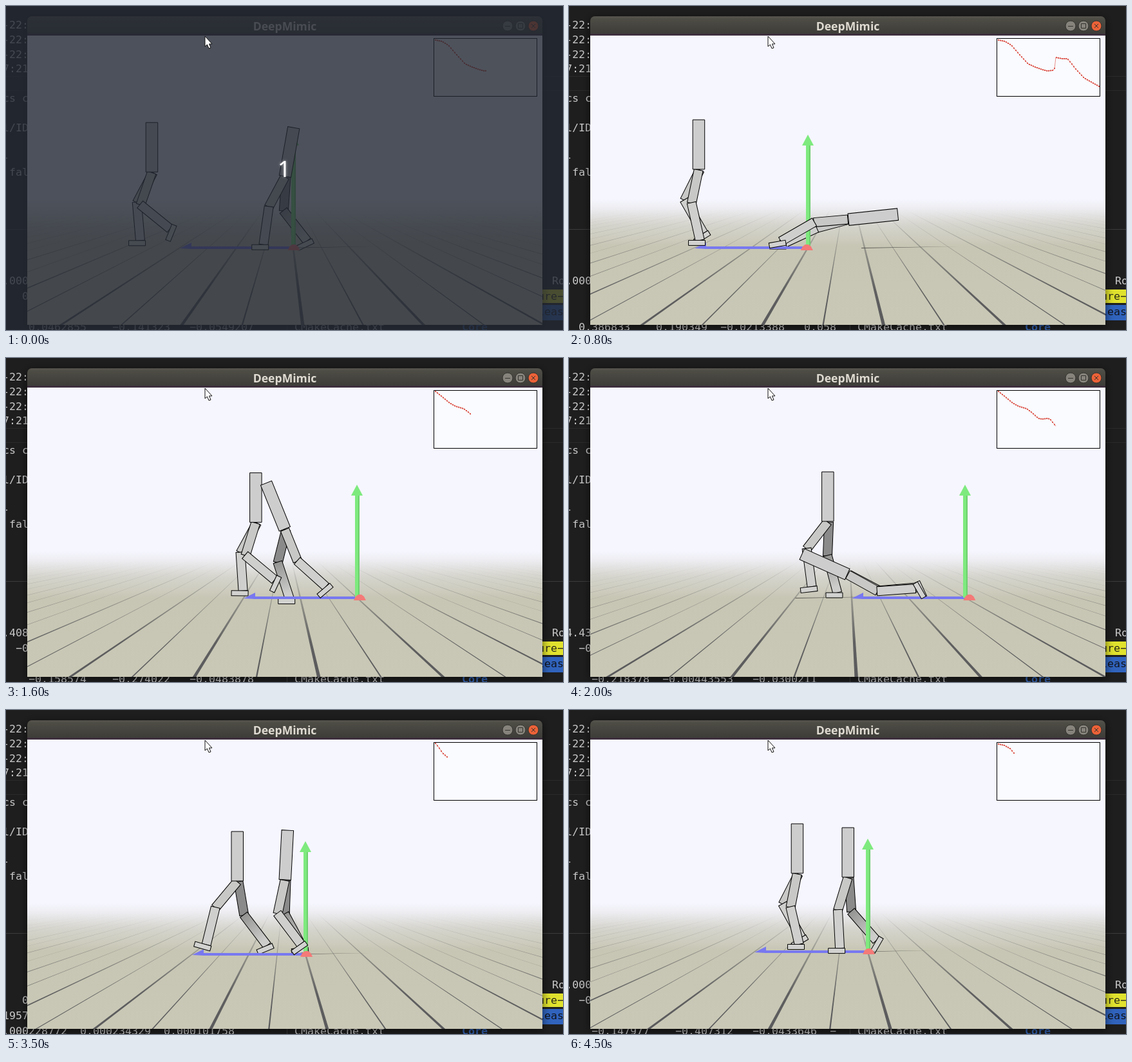
Animation, 865 px wide and 504 px high, one loop 4600 ms. Source, as an HTML page with a canvas:

```html
<!DOCTYPE html>
<html lang="en">
<head>
<meta charset="utf-8">
<title>DeepMimic</title>
<style>
html, body { margin: 0; width: 865px; height: 504px; overflow: hidden; background: #1e1e1e; }
canvas { display: block; }
</style>
</head>
<body>
<canvas id="stage" width="865" height="504"></canvas>
<script>
const g = document.getElementById('stage').getContext('2d');
const LOOP = 4600, STEP = 100, VX = 433, VY = 270;
const MONO = '"DejaVu Sans Mono", monospace';

// Terminal output: start time, three left-hand rows, bottom row
const rows = [
  [0, '.000', '   0', '', '    0.0462855    −0.141323   −0.0549207'],
  [200, '.000', '', '', '  0.386833    0.190349  −0.0213388   0.058'],
  [900, '.408', '  −0', '', '    −0.158574    −0.274022   −0.0483878'],
  [1800, '4.43', '  −0', '', '    −0.218378  −0.00443553   −0.0300211'],
  [2500, '.018', '  0.', '', '    −0.152534    0.0369446   −0.0526555'],
  [3300, '', '   0', '1957', '.000228772  0.000234329  0.000101758'],
  [4300, '.000', '  −0', '', '    −0.147977    −0.407312   −0.0433646  −']
];

// One leg over a stride: phase, thigh, shin and foot angle in degrees
const stride = [
  [0, 40, 14, 16], [.12, 28, -5, 0], [.25, 11, -13, 0], [.36, 2, -15, 0],
  [.5, -10, -37, -22], [.62, 19, -51, -68], [.75, 27, -29, -30], [.86, 38, -7, -6], [1, 40, 14, 16]
];
const fallen = [-66, -61, -94, -120, -62, -95, -115];

// Pose keys: time, torso, near leg (3), far leg (3), x, hip height
const episodes = [
  { begin: -820, ground: 376, phase: .256, x: 57, rate: .0975,
    keys: [[0, 10, 28, 8, 0, 4, -38, -25, -13, 110], [400, 36, 42, 23, -10, 31, -27, 0, 23, 102],
      [800, 84, 85, 60, -10, 75, 65, 0, 62, 44]],
    reward: [667, 53, 677, 55, 687, 61, 700, 76, 713, 90, 724, 95, 735, 99, 743, 101, 752, 100,
      754, 97, 756, 80, 766, 82, 774, 82, 780, 89, 786, 97, 800, 112, 823, 125] },
  { begin: 940, ground: 373, phase: .21, x: -65, rate: .084,
    keys: [[1200, -4, 9, -15, -4, -7, -34, -35, -41, 114], [1600, -22, -22, -48, -40, 14, -18, 0, -112, 106],
      [2000, ...fallen, -182, 36]],
    reward: [667, 52, 677, 60, 689, 70, 698, 75, 711, 79, 719, 85, 729, 94, 735, 95, 743, 94, 747, 95, 756, 106, 766, 115] },
  { begin: 2060, ground: 380, phase: .45, x: -57, rate: .098,
    keys: [[2700, -18, -15, -49, -78, -3, -36, 0, -87, 107], [3150, ...fallen, -165, 36]],
    reward: [667, 52, 678, 62, 698, 67, 710, 75, 716, 79, 720, 78, 731, 80, 745, 84, 760, 96, 790, 118] },
  { begin: 3300, ground: 380, phase: -.12, x: -78, rate: .09,
    keys: [[3500, 3, 12, -37, -35, 2, -28, -5, -32, 115], [3850, -20, -20, -52, -70, -2, -35, 0, -88, 107],
      [4200, ...fallen, -165, 36]],
    reward: [667, 52, 672, 58, 678, 67, 685, 73, 700, 80, 715, 84, 735, 97, 755, 112] },
  { begin: 4230, ground: 376, phase: .085, x: -72, rate: .093,
    keys: [[4500, 0, 17, -3, 0, -4, -41, -60, -31, 115]],
    reward: [667, 53, 676, 55, 685, 60, 691, 67, 705, 80] }
];

// Linear interpolation in a table whose first column is the position
function sample(table, at) {
  const last = table[table.length - 1];
  if (at >= last[0]) return last.slice(1);
  const i = Math.max(1, table.findIndex(r => r[0] > at));
  const a = table[i - 1], b = table[i], k = (at - a[0]) / (b[0] - a[0]);
  return a.slice(1).map((v, j) => v + (b[j + 1] - v) * k);
}

const leg = p => sample(stride, p - Math.floor(p));
const walk = (p, x) => [0, ...leg(p), ...leg(p + .5), x, 117 - 4 * Math.cos(4 * Math.PI * p)];
const current = (list, t, time) => list.filter(e => time(e) <= t).pop();

function text(s, x, y, font, color, align = 'left') {
  g.font = font;
  g.fillStyle = color;
  g.textAlign = align;
  g.fillText(s, x, y);
}

function shape(points, fill, stroke) {
  g.beginPath();
  for (let i = 0; i < points.length; i += 2) g.lineTo(points[i], points[i + 1]);
  g.closePath();
  g.fillStyle = fill;
  g.fill();
  if (stroke) { g.strokeStyle = stroke; g.lineWidth = 1; g.stroke(); }
}

function box(x, y, w, h, fill) {
  g.fillStyle = fill;
  g.fillRect(x, y, w, h);
}

function fade(top, bottom, ...stops) {
  const gradient = g.createLinearGradient(0, top, 0, bottom);
  stops.forEach(([at, color]) => gradient.addColorStop(at, color));
  return gradient;
}

function terminal(t) {
  box(0, 0, 865, 504, '#1e1e1e');
  box(0, 109, 865, 1, '#2b2b2b');
  box(0, 131, 865, 1, '#2b2b2b');
  box(0, 347, 865, 1, '#3c3c3c');
  const font = '16.61px ' + MONO, grey = '#c9c9c9';
  const put = (s, x, y, color = grey) => text(s, x, y, font, color);
  [['-22:', 35], ['-22:', 58], ['-22:', 81], ['7:21', 103], ['cs c', 149], ['l/ID', 195], ['-', 241], [' fal', 264]]
    .forEach(([s, y]) => put(s, -5, y));
  const row = current(rows, t, r => r[0]);
  [433, 457, 481, 505].forEach((y, i) => put(row[i + 1], -5, y));
  box(436, 490, 1, 14, '#3c3c3c');
  put('CMakeCache.txt', 448, 505);
  text('Core', 708, 505, 'bold ' + font, '#3465b8');
  put('Ro', 848, 433);
  box(833, 441, 32, 21, '#e0e22e');
  box(833, 465, 32, 24, '#3063bd');
  put('ure−', 826, 457, '#2a2a18');
  put('leas', 826, 481, '#12151c');
}

function titleBar() {
  g.save();
  g.shadowColor = 'rgba(0,0,0,.6)';
  g.shadowBlur = 14;
  g.shadowOffsetY = 3;
  g.beginPath();
  g.roundRect(33, 16, 800, 480, [7, 7, 0, 0]);
  g.fillStyle = fade(16, 45, [0, '#57554d'], [.15, '#4d4c45'], [1, '#3c3b37']);
  g.fill();
  g.restore();
  box(33, 43, 800, 3, '#3d2f3c');
  text('DeepMimic', 433, 38, 'bold 17.6px "Noto Sans", "Open Sans", sans-serif', '#dfdbd2', 'center');
  [779, 799, 819].forEach((x, i) => {
    g.beginPath();
    g.arc(x, 31, 8, 0, 7);
    g.fillStyle = i == 2 ? '#ec6238' : '#85837b';
    g.fill();
    g.strokeStyle = '#34332e';
    g.lineWidth = 1;
    g.stroke();
    g.beginPath();
    if (i == 0) { g.moveTo(x - 4, 31.5); g.lineTo(x + 4, 31.5); }
    if (i == 1) g.rect(x - 3.5, 27.5, 7, 7);
    if (i == 2) { g.moveTo(x - 3, 28); g.lineTo(x + 3, 34); g.moveTo(x + 3, 28); g.lineTo(x - 3, 34); }
    g.stroke();
  });
}

function floor(ox, oy) {
  box(33, 46, 800, 450, fade(300, 496, [0, '#f6f6ff'], [.08, '#ececf0'], [.2, '#d6d5ce'],
    [.38, '#c7c6b4'], [1, '#c9c8b6']));
  const ink = fade(315, 496, [0, 'rgba(90,90,92,0)'], [.3, 'rgba(90,90,92,.4)'], [.7, 'rgba(90,90,92,.95)'], [1, '#5a5a5c']);
  const near = (496 - VY) / (oy - VY), far = (315 - VY) / (oy - VY);
  for (let k = -34; k <= 34; k++) {
    const d = ox - VX + k * 44, w = k % 2 ? .55 : 1.25;
    shape([VX + (d - w) * far, 315, VX + (d + w) * far, 315, VX + (d + w) * near, 496, VX + (d - w) * near, 496], ink);
  }
}

function axes(ox, oy, simX) {
  const end = ox + 145 + 1.42 * simX;
  shape([end - 150, oy, end, oy - 2, end - 150, oy + 1], '#55554f');
  box(ox - 160, oy - 2, 160, 4, '#7878f0');
  shape([ox - 176, oy + 1, ox - 158, oy - 8, ox - 158, oy + 2], '#7878f0');
  box(ox - 3, oy - 160, 7, 160, '#7eea7e');
  box(ox + 2, oy - 160, 2, 160, '#6fce6f');
  shape([ox, oy - 176, ox + 9, oy - 159, ox - 9, oy - 159], '#7eea7e');
  const r = ox + (ox - VX) * .035;
  shape([-9, 4, -6, -2, -2, -5, 3, -5, 7, -2, 10, 4].map((v, i) => v + (i % 2 ? oy : r)), '#f47a78');
}

function bar(x, y, angle, rect, fill) {
  g.save();
  g.translate(x, y);
  g.rotate(angle * Math.PI / 180);
  g.beginPath();
  g.rect(...rect);
  g.fillStyle = fill;
  g.fill();
  g.strokeStyle = '#000';
  g.lineWidth = 1;
  g.stroke();
  g.restore();
}

function drawLeg(x, y, [thigh, shin, foot], shaded) {
  const rad = Math.PI / 180;
  const kneeX = x - 53 * Math.sin(thigh * rad), kneeY = y + 53 * Math.cos(thigh * rad);
  const ankleX = kneeX - 60 * Math.sin(shin * rad), ankleY = kneeY + 60 * Math.cos(shin * rad);
  const dark = shaded && Math.abs(thigh) < 22;
  bar(x, y, thigh, [-7, 0, 14, 53], dark ? '#8a8a8a' : '#c8c8c6');
  bar(kneeX, kneeY, shin, [-7, -1, 14, 60], dark ? fade(0, 50, [0, '#959593'], [1, '#cdcdcb']) : '#cfcfcd');
  bar(ankleX, ankleY, foot, [-18, -1, 26, 8], '#d2d2d0');
}

function figure(pose, ox, oy) {
  const x = ox + pose[7], y = oy - pose[8];
  return {
    back: () => drawLeg(x + 2, y, pose.slice(4, 7), true),
    front: () => {
      drawLeg(x, y, pose.slice(1, 4), false);
      bar(x, y, pose[0], [-9, -78, 18.5, 77], '#cdcdcd');
    }
  };
}

function chart(ep, t) {
  box(664, 50, 161, 91, '#000');
  box(665, 51, 159, 89, '#f9fbff');
  const table = [];
  for (let i = 0; i < ep.reward.length; i += 2) table.push(ep.reward.slice(i, i + 2));
  const end = Math.min(823, 667 + ep.rate * (t - ep.begin));
  g.beginPath();
  for (let x = 667; x <= end; x++) g.lineTo(x, sample(table, x)[0]);
  g.strokeStyle = 'rgba(225,85,75,.65)';
  g.lineWidth = 1;
  g.stroke();
  for (let x = 667; x <= end; x += 3) box(x - 1, sample(table, x)[0] - 1, 2, 2, '#dc5248');
}

function draw(t) {
  const ep = current(episodes, t, e => e.begin), dt = t - ep.begin;
  let phase = ep.phase + .00061 * dt, guideX = ep.x - .14 * dt;
  // The guide's walk wraps right after the first step
  if (t < 100) { phase -= .136; guideX -= 162; }
  const sim = sample([[ep.begin, ...walk(ep.phase, 0)], ...ep.keys], t);
  const ox = VX - sim[7], oy = ep.ground;

  terminal(t);
  titleBar();
  g.save();
  g.beginPath();
  g.rect(33, 46, 800, 450);
  g.clip();
  floor(ox, oy);
  const people = [figure(walk(phase, guideX), ox, oy), figure(sim, ox, oy)];
  people.forEach(p => p.back());
  axes(ox, oy, sim[7]);
  people.forEach(p => p.front());
  chart(ep, t);
  g.restore();

  if (t < 100) box(0, 0, 865, 504, 'rgba(36,41,51,.8)');
  shape([309, 47, 309, 63, 312.5, 60, 315, 66, 318, 65, 315.5, 59, 320, 59], '#fff', '#111');
  if (t < 100) {
    g.save();
    g.shadowColor = 'rgba(255,255,255,.6)';
    g.shadowBlur = 4;
    text('1', 432, 266, '35px "Noto Sans", "Open Sans", sans-serif', '#fff', 'center');
    g.restore();
  }
}

const start = performance.now();
function tick() {
  const t = Math.max(0, performance.now() - start) % LOOP;
  draw(Math.floor(t / STEP) * STEP);
  requestAnimationFrame(tick);
}
tick();
</script>
</body>
</html>
```
